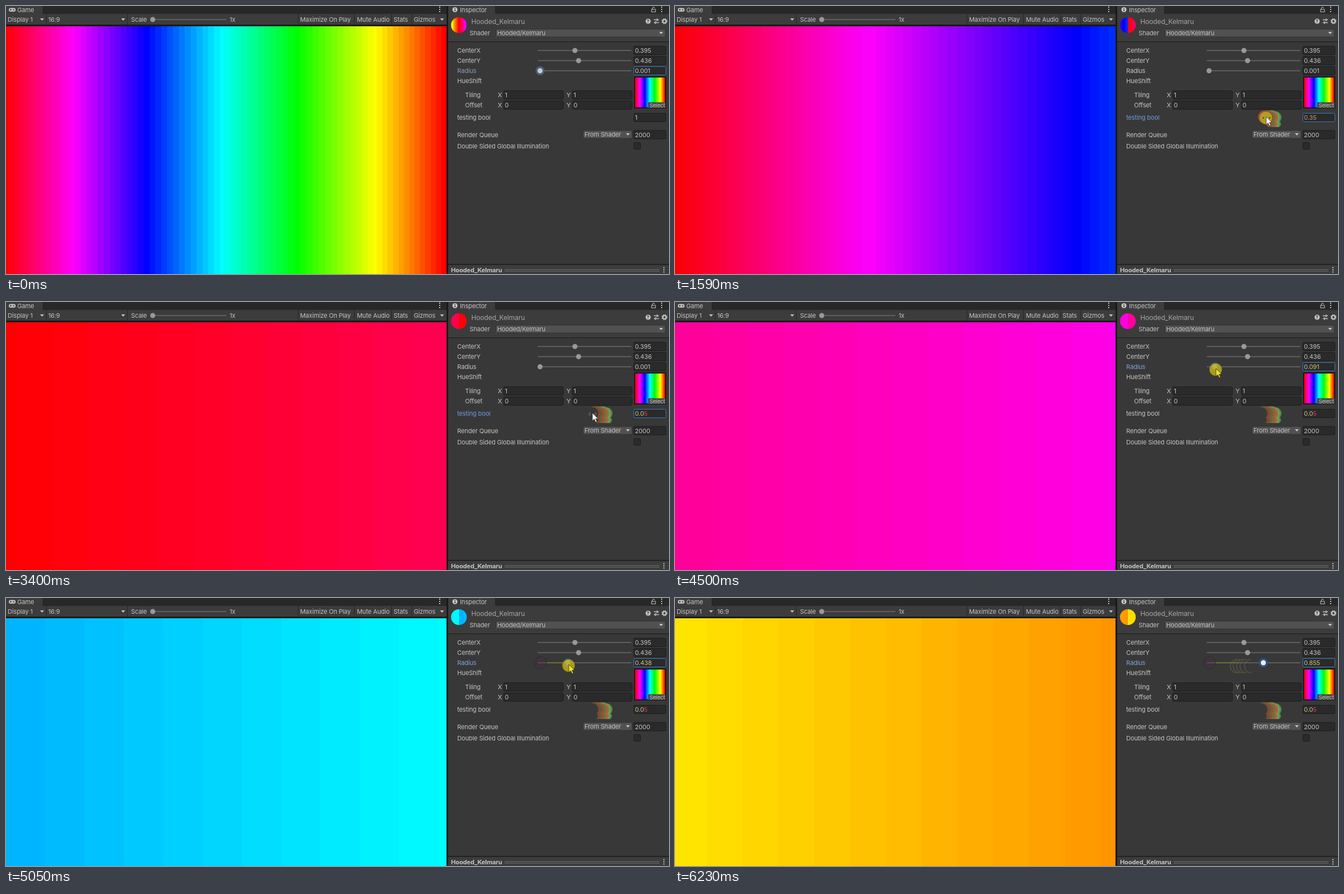
Write an HTML page with a canvas that moves like this. It is 1177x476 px and loops after 6.63 s.

```html
<!DOCTYPE html>
<html lang="en">
<head>
<meta charset="utf-8">
<style>
  html, body { margin: 0; width: 100%; height: 100%; overflow: hidden; background: #383838; }
  svg, canvas { position: absolute; left: 0; top: 0; }
  #view { top: 36px; width: 782px; height: 440px; }
  #ball { left: 790px; top: 20px; width: 28px; height: 28px; border-radius: 50%; }
  text { font: 11px Inter, sans-serif; letter-spacing: -.15px; fill: #c4c4c4; white-space: pre; }
</style>
</head>
<body>
<svg id="panel" width="1177" height="476" viewBox="0 0 1177 476"></svg>
<canvas id="view" width="782" height="1"></canvas>
<canvas id="ball" width="28" height="1"></canvas>
<svg id="overlay" width="1177" height="476" viewBox="0 0 1177 476"></svg>
<script>
const LOOP = 6630;
const NAME = 'Hooded_Kelmaru';
const $ = id => document.getElementById(id);

// Small SVG helpers
const rect = (x, y, w, h, fill, more = '') => `<rect x="${x}" y="${y}" width="${w}" height="${h}" fill="${fill}" ${more}/>`;
const text = (x, y, s, more = '') => `<text x="${x}" y="${y}" ${more}>${s}</text>`;
const dot = (x, y, r, fill, more = '') => `<circle cx="${x}" cy="${y}" r="${r}" fill="${fill}" ${more}/>`;
const path = (d, more) => `<path d="${d}" ${more}/>`;
const arrowDown = (x, y) => path(`M${x - 3.5} ${y - 2}h7l-3.5 4z`, 'fill="#c4c4c4"');
const menuDots = (x, y) => [-4, 0, 4].map(d => rect(x - 1, y + d - 1, 2, 2, '#c4c4c4')).join('');
const field = (x, y, w, s = '', id = '') =>
  rect(x + .5, y - 7.5, w - 1, 15, '#2a2a2a', `rx="2" stroke="#1d1d1d" ${id && `id="${id}Box"`}`) +
  text(x + 2.5, y + 4, s, id && `id="${id}Text"`);
const slider = (y, knob) => rect(944, y - 1, 166, 2, '#5e5e5e') + (knob ? dot(knob, y, 4.5, '#999') : '');
const dropdown = (x, y, w, s) =>
  rect(x + .5, y - 7, w - 1, 14, '#515151', 'rx="2" stroke="#303030"') + text(x + 3, y + 4, s) + arrowDown(x + w - 8, y);

// Hue strip: red, magenta, blue, cyan, green, yellow, red
const HUES = [[255, 0, 0], [255, 0, 255], [0, 0, 255], [0, 255, 255], [0, 255, 0], [255, 255, 0], [255, 0, 0]];
const STOPS = [0, .155, .32, .49, .662, .84, .995];

function hueAt(u, step) {
  u -= Math.floor(u);
  const i = Math.min(5, STOPS.findLastIndex(s => s <= u));
  const k = Math.min(1, (u - STOPS[i]) / (STOPS[i + 1] - STOPS[i]));
  const rgb = HUES[i].map((c, n) => {
    const v = c + (HUES[i + 1][n] - c) * k;
    return Math.min(255, Math.round(v / step) * step);
  });
  return `rgb(${rgb})`;
}

function drawPanel() {
  const stops = HUES.map((c, i) => `<stop offset="${STOPS[i]}" stop-color="rgb(${c})"/>`).join('');
  $('panel').innerHTML = `<linearGradient id="strip">${stops}</linearGradient>` +
    // Game tab and toolbar
    rect(0, 0, 783, 14, '#282828') + rect(0, 0, 65, 14, '#3c3c3c') + rect(0, 14, 783, 19, '#3c3c3c') +
    rect(0, 33, 783, 3, '#191919') + rect(782, 0, 3, 476, '#191919') +
    rect(5, 3.5, 12, 6.5, '#c4c4c4', 'rx="3.2"') + rect(7, 6, 3, 1.2, '#3c3c3c') + rect(7.9, 5.1, 1.2, 3, '#3c3c3c') +
    dot(13.5, 6.7, 1.2, '#3c3c3c') + text(20, 11, 'Game') + menuDots(770, 6) +
    [71, 215, 518, 618, 684, 720].map(x => rect(x, 14, 1, 19, '#262626')).join('') +
    text(3, 28, 'Display 1') + arrowDown(64, 24) + text(75, 28, '16:9') + arrowDown(208, 24) +
    text(222, 28, 'Scale') + rect(260, 23, 131, 2, '#5e5e5e') + dot(260.5, 24, 4.5, '#999') + text(397, 28, '1x') +
    text(522, 28, 'Maximize On Play') + text(623, 28, 'Mute Audio') + text(688, 28, 'Stats') +
    text(724, 28, 'Gizmos') + arrowDown(774, 24) +
    // Inspector tab and header
    rect(785, 0, 392, 14, '#282828') + rect(785, 0, 83, 14, '#3c3c3c') + rect(785, 14, 392, 49, '#3c3c3c') +
    rect(785, 63, 392, 1, '#1a1a1a') + dot(797, 6.5, 4.5, '#c4c4c4') + rect(796.2, 6, 1.6, 3.2, '#333') +
    rect(796.2, 3.6, 1.6, 1.5, '#333') + text(806, 11, 'Inspector') +
    rect(1146, 6, 7, 4.5, 'none', 'stroke="#c4c4c4"') + path('M1147.5 6V4a2 2 0 0 1 4 0', 'fill="none" stroke="#c4c4c4"') +
    menuDots(1164, 6) +
    text(826, 32, NAME, 'style="font-size:12px;fill:#a6a6a6"') +
    text(823, 52, 'Shader') + dropdown(869, 48, 302, NAME.replace('_', '/')) +
    dot(1140, 27, 4.6, '#c4c4c4') + text(1137.6, 30, '?', 'style="font-size:8px;font-weight:700;fill:#333"') +
    path('M1150 24.5h9M1150 29.5h9M1156 22v5M1153 27v5', 'stroke="#c4c4c4" stroke-width="1.3"') +
    dot(1169, 27, 3, 'none', 'stroke="#c4c4c4" stroke-width="2.2"') +
    dot(1169, 27, 4.5, 'none', 'stroke="#c4c4c4" stroke-width="1.5" stroke-dasharray="1.8 1.73"') +
    // Properties
    text(801, 83, 'CenterX') + slider(79, 1010) + field(1114, 79, 58, '0.395') +
    text(801, 101, 'CenterY') + slider(97, 1016.5) + field(1114, 97, 58, '0.436') +
    text(801, 119, 'Radius', 'id="radiusLabel"') + slider(115) + field(1114, 115, 58, '', 'radius') +
    text(801, 137, 'HueShift') +
    ['Tiling', 'Offset'].map((label, i) => {
      const y = 158 + i * 18, v = 1 - i;
      return text(815, y + 4, label) + text(873, y + 4, 'X') + field(883, y, 107, v) +
        text(995, y + 4, 'Y') + field(1005, y, 107, v, 'y' + i);
    }).join('') +
    rect(1115, 125, 57, 57, '#1a1a1a') + rect(1117, 127, 53, 53, 'url(#strip)') +
    rect(1140, 171, 31, 10, '#484848') + text(1142.5, 179.5, 'Select', 'style="font-size:9.5px"') +
    text(801, 202, 'testing bool', 'id="boolLabel"') + field(1114, 198, 58, '', 'bool') +
    text(801, 233, 'Render Queue') + dropdown(1024, 228, 88, 'From Shader') + field(1114, 228.5, 58, '2000') +
    text(801, 253, 'Double Sided Global Illumination') +
    rect(1114.5, 242.5, 12, 12, '#2a2a2a', 'rx="2" stroke="#1d1d1d"') +
    // Preview bar
    rect(785, 458, 392, 2, '#222') + rect(785, 460, 392, 16, '#3c3c3c') +
    text(790, 473, NAME, 'style="font-weight:700"') +
    rect(885, 467.5, 275, 1, '#707070') + rect(885, 470.5, 275, 1, '#707070') + menuDots(1168, 468.5);
}

// Smears left behind by the two drags
const SMEAR = [[1066, '#3d9550'], [1063, '#7d9a55'], [1060, '#b0603f'], [1056, '#6a7638'],
  [1052, '#9a4f39'], [1049, '#66603a'], [1046, '#7a4a35']];
const RINGS = [994, 999, 1005, 1011, 1019, 1027, 1034];

function drawOverlay() {
  const blob = (x, fill) => path(`M${x} 187a11 11 0 0 1 8 18l2 5-3 5h-6l-4-4-8-4a11 11 0 0 1 11-20z`, `fill="${fill}"`);
  $('overlay').innerHTML =
    `<g id="smear">${SMEAR.map(([x, c]) => blob(x, c)).join('')}${blob(1041, '#383838')}</g>` +
    `<g id="rings">${dot(949, 115, 11, '#4a2a48', 'fill-opacity=".35" stroke="#2c2c2c"')}` +
    rect(960, 114, 42, 2, '#6e7038') +
    RINGS.map(x => path(`M${x + 4} 109a12 12 0 0 0 0 24`, `data-x="${x}" fill="none" stroke="#7c7c45" stroke-width="1.6" opacity=".4"`)).join('') +
    '</g>' +
    `<g id="knob">${dot(0, 115, 8, '#3d5570', 'id="halo"')}${dot(0, 115, 4.5, '#999', 'id="disc"')}</g>` +
    `<g id="cursor">${dot(-.5, 0, 11, '#b8a818', 'id="press" opacity=".88"')}` +
    path('M-7 0l3-2.5v5zM8 0l-3-2.5v5z', 'id="sideArrows" fill="#151515" stroke="#d8d080" stroke-width=".5"') +
    path('M0-2v14l3.4-3 2.3 5.4 2.4-1-2.4-5.2h4.4z', 'id="pointer" fill="#fff" stroke="#222" stroke-width=".7"') + '</g>';
}

// Tables of [time, values...]
const CURSOR = [[140, 766, 14], [750, 1072, 189], [890, 1072, 197], [1160, 1071, 198], [1400, 1061, 198],
  [1700, 1043, 199], [2000, 1038, 199], [2790, 1038, 199], [3000, 1041, 199], [3540, 1041, 199],
  [4170, 950, 116], [4290, 950, 120], [4360, 950, 120], [4770, 980, 120], [5400, 1023, 120],
  [5820, 1046, 120], [5950, 1046, 120], [6230, 833, -20]];
const BOOL = [[1160, 1], [1400, .7], [1700, .15], [2000, -.01], [2790, -.01], [3000, .05]];
const RADIUS = [[4360, .001], [4770, .264], [5400, .655], [5820, .855]];

function sample(keys, t) {
  if (t <= keys[0][0]) return keys[0].slice(1);
  const i = keys.findIndex(k => k[0] > t);
  if (i < 0) return keys.at(-1).slice(1);
  const a = keys[i - 1], b = keys[i], k = (t - a[0]) / (b[0] - a[0]);
  return a.slice(1).map((v, n) => v + (b[n + 1] - v) * k);
}

function paintColumns(canvas, uAt, step) {
  const ctx = canvas.getContext('2d');
  for (let x = 0; x < canvas.width; x++) {
    ctx.fillStyle = hueAt(uAt((x + .5) / canvas.width), step);
    ctx.fillRect(x, 0, 1, 1);
  }
}

const set = (id, attrs) => { for (const k in attrs) $(id).setAttribute(k, attrs[k]); };
const show = (id, on) => { $(id).style.display = on ? '' : 'none'; };
const tint = (s, fill) => `<tspan fill="${fill}">${s}</tspan>`;

function render(t) {
  const [cx, cy] = sample(CURSOR, t);
  const bool = Math.round(sample(BOOL, t)[0] * 100) / 100;
  const radius = sample(RADIUS, t)[0];
  const boolDrag = t >= 1200 && t < 4290, radiusDrag = t >= 4290;

  const step = 6 + 14 * Math.max(0, bool);
  paintColumns($('view'), x => radius + bool * x, step);
  paintColumns($('ball'), x => {
    const u = Math.asin(2 * x - 1) / (2 * Math.PI);
    return radius + bool * (u < 0 ? u + 1 : u);
  }, step);

  const value = radius.toFixed(3);
  $('radiusText').innerHTML = radiusDrag && t > 4360
    ? value.slice(0, 2) + tint(value.slice(2), t > 5900 ? '#c9c56a' : '#d2c46c') : value;
  const b = bool.toFixed(2);
  $('boolText').innerHTML = bool === 1 ? '1'
    : t > 2790 ? tint(b.slice(0, -1), '#cfc08a') + tint(b.slice(-1), '#d0405a') : tint(b, '#c98f78');

  $('radiusLabel').style.fill = radiusDrag ? '#7fa3dc' : boolDrag ? '' : '#8c9db5';
  $('boolLabel').style.fill = boolDrag ? '#6f9be0' : '';
  set('radiusBox', { stroke: boolDrag ? '#1d1d1d' : '#3a79bb' });
  set('boolBox', { stroke: boolDrag ? '#3a79bb' : '#1d1d1d' });

  const visible = t >= 140 && t < 6230;
  const pressed = t >= 1040 && t < 3400 || t >= 4290 && t < 5900;
  [158, 176].forEach((y, i) => {
    const over = visible && !pressed && cx > 1005 && cx < 1112 && Math.abs(cy - y) < 8;
    set(`y${i}Box`, { stroke: over ? '#656565' : '#1d1d1d' });
  });

  set('knob', { transform: `translate(${948 + 112.8 * radius})` });
  show('halo', !boolDrag);
  set('halo', { fill: radiusDrag ? '#285785' : '#4b5d70' });
  set('disc', { fill: radiusDrag ? '#eee' : boolDrag ? '#999' : '#c4ccd4' });

  show('smear', t >= 1230);
  [...$('smear').children].forEach((el, i) => {
    const x = SMEAR[i] ? SMEAR[i][0] : 1044;
    el.style.display = t >= 2000 || cx < x ? '' : 'none';
  });
  show('rings', t >= 4600);
  $('rings').querySelectorAll('[data-x]').forEach(el => {
    el.style.display = el.dataset.x < 930 + 112.8 * radius ? '' : 'none';
  });
  $('rings').children[1].style.display = t >= 5000 ? '' : 'none';

  show('cursor', visible);
  set('cursor', { transform: `translate(${cx} ${cy})` });
  show('press', pressed);
  show('sideArrows', t >= 820 && t < 3540);
  const green = t > 5100 && t < 5600;
  set('press', { fill: green ? '#a9c81c' : '#b8a818' });
  set('pointer', { fill: pressed && radiusDrag ? (green ? '#c4f02c' : '#ebe13c') : '#fff' });
}

drawPanel();
drawOverlay();
const start = performance.now();
(function tick() {
  render((performance.now() - start) % LOOP);
  requestAnimationFrame(tick);
})();
</script>
</body>
</html>
```
